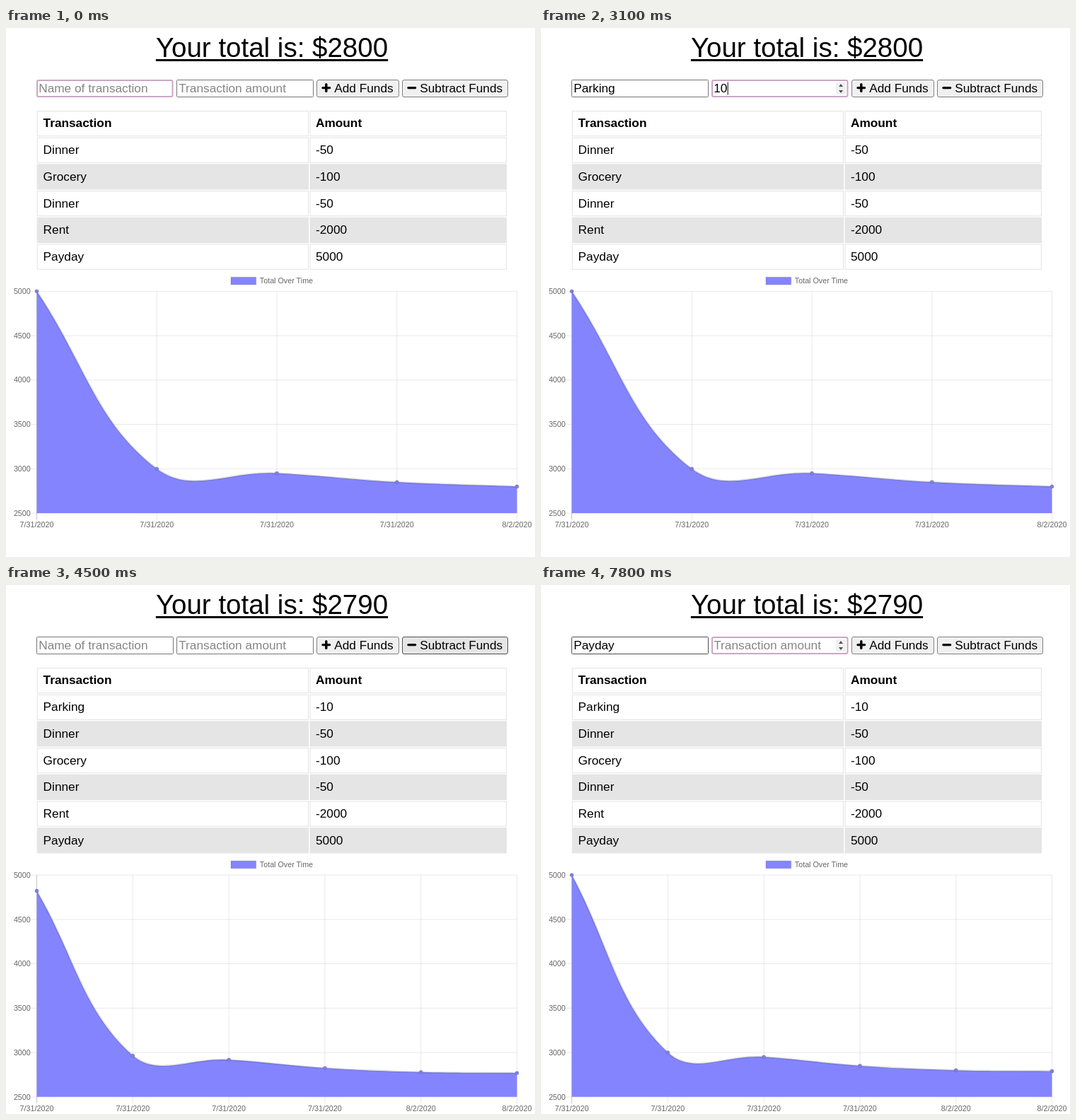
An HTML page for the animation above (8 s loop, 748 by 748 pixels).

```html
<!DOCTYPE html>
<html lang="en">
<head>
<meta charset="utf-8">
<title>Budget tracker</title>
<style>
html, body { margin: 0; width: 100%; height: 100%; overflow: hidden; background: #fff; }
body { position: relative; font-family: "Liberation Sans", Arial, sans-serif; }
h1 {
  position: absolute; left: 0; top: 6px; width: 752px; margin: 0;
  font-size: 38.5px; font-weight: 400; line-height: 44px; text-align: center; white-space: nowrap;
  text-decoration: underline; text-decoration-thickness: 3px; text-underline-offset: 3px;
}
svg { position: absolute; left: 0; top: 0; font-size: 17.25px; }
</style>
</head>
<body>
<h1 id="total"></h1>
<svg id="view" width="748" height="748" viewBox="0 0 748 748"></svg>
<script>
const LOOP = 8000, STEP = 100;
const FILL = '#8485fe', LINE = 'rgba(0,0,0,.1)';
const total = document.getElementById('total');
const view = document.getElementById('view');
const pen = document.createElement('canvas').getContext('2d');
pen.font = '17.25px "Liberation Sans", Arial, sans-serif';

const rows = [['Dinner', -50], ['Grocery', -100], ['Dinner', -50], ['Rent', -2000], ['Payday', 5000]];
const days = ['7/31/2020', '7/31/2020', '7/31/2020', '7/31/2020', '8/2/2020'];
const totals = [5000, 3000, 2950, 2850, 2800];

// Key press times of each typed word
const parking = [1000, 1200, 1300, 1500, 1600, 1700, 1800];
const ten = [2500, 2700];
const payday = [6000, 6200, 6300, 6500, 6600, 6800];
const caretEvents = [-900, ...parking, 2100, ...ten, 5700, ...payday, 7200];

const typed = (word, keys, t) => word.slice(0, keys.filter(k => k <= t).length);
const rect = (x, y, w, h, fill, stroke = 'none', r = 0, sw = 1) =>
  `<rect x="${x}" y="${y}" width="${w}" height="${h}" rx="${r}" fill="${fill}" stroke="${stroke}" stroke-width="${sw}"/>`;
const text = (x, y, s, attrs = '') => `<text x="${x}" y="${y}" ${attrs}>${s}</text>`;
const path = (d, attrs) => `<path d="${d}" ${attrs}/>`;

function field(x, hint, value, focused, hovered, caret, spinner) {
  let s = focused
    ? rect(x + 1, 74, 191.5, 23, '#fff', '#cba6c4', 2, 2)
    : rect(x + .5, 73.5, 193, 24, '#fff', hovered ? '#4f4f4f' : '#767676', 1);
  s += text(x + 3.2, 91, value || hint, `fill="${value ? '#000' : '#858585'}"`);
  if (focused && spinner) {
    s += rect(x + 176, 77, 14, 17, '#f0f0f0');
    s += path(`M${x + 180} 83l3-4 3 4zM${x + 180} 88l3 4 3-4z`, 'fill="#505050"');
  }
  if (focused && caret) s += rect(x + 3.5 + pen.measureText(value).width, 76.5, 1, 18, '#000');
  return s;
}

function button(x, w, label, icon, mode) {
  const [fill, edge] = { idle: ['#f0f0f0', '#808080'], hover: ['#e5e5e5', '#4f4f4f'], press: ['#f6f6f6', '#a6a6a6'] }[mode];
  return rect(x + .5, 73.5, w, 24, fill, edge, 2.5) +
    path(icon, 'stroke="#000" stroke-width="3.4" stroke-linecap="round"') +
    text(x + 25.2, 91, label);
}

function table(list) {
  return [['Transaction', 'Amount'], ...list].map((row, i) => {
    const y = 117.3 + 37.7 * i;
    const shade = i && i % 2 === 0 ? '#e5e5e5' : '#fff';
    const attrs = i ? '' : 'font-weight="700"';
    return rect(44.2, y + .2, 383.3, 35.2, shade, '#e3e3e3') + rect(430, y + .2, 277.4, 35.2, shade, '#e3e3e3') +
      text(52.6, y + 23.1, row[0], attrs) + text(438, y + 23.1, row[1], attrs);
  }).join('');
}

// Control points of a cardinal-like spline, tension 0.4, kept inside the plot
function controls(pts, top, bottom) {
  const clamp = y => Math.min(bottom, Math.max(top, y));
  return pts.map((p, i) => {
    const a = pts[i - 1] || p, b = pts[i + 1] || p;
    const da = Math.hypot(p[0] - a[0], p[1] - a[1]), db = Math.hypot(b[0] - p[0], b[1] - p[1]);
    const fa = .4 * da / (da + db), fb = .4 * db / (da + db);
    return [
      p[0] - fa * (b[0] - a[0]), clamp(p[1] - fa * (b[1] - a[1])),
      p[0] + fb * (b[0] - a[0]), clamp(p[1] + fb * (b[1] - a[1]))
    ];
  });
}

function chart(values, labels, dy, grow) {
  const left = 43.5, right = 722.5, top = 372.3 + dy, bottom = 686 + dy;
  const xAt = i => left + (right - left) * i / (values.length - 1);
  const small = 'font-size="10.75" fill="#666"';
  let s = rect(318, 352.3 + dy, 35.6, 10.6, FILL, LINE, 0, 1.5) + text(358.8, 361.4 + dy, 'Total Over Time', small);

  for (let i = 0; i < 6; i++) {
    const y = top + (bottom - top) * i / 5;
    s += path(`M35 ${y}H${right}`, `stroke="${LINE}" stroke-width=".9"`);
    s += text(34.8, y + 3.7, 5000 - 500 * i, small + ' text-anchor="end"');
  }
  labels.forEach((day, i) => {
    s += path(`M${xAt(i)} ${top}V${bottom + 9}`, `stroke="rgba(0,0,0,${i ? .1 : .25})" stroke-width=".9"`);
    s += text(xAt(i), bottom + 19.8, day, small + ' text-anchor="middle"');
  });

  const mix = (a, b) => a.map((v, i) => v + (b[i] - v) * grow);
  const flat = values.map((v, i) => [xAt(i), bottom]);
  const full = values.map((v, i) => [xAt(i), bottom - (v - 2500) / 2500 * (bottom - top)]);
  const flatCtl = controls(flat, top, bottom), fullCtl = controls(full, top, bottom);
  const pts = flat.map((p, i) => mix(p, full[i]));
  const ctl = flatCtl.map((c, i) => mix(c, fullCtl[i]));
  let curve = `M${pts[0]}`;
  for (let i = 1; i < pts.length; i++) curve += `C${ctl[i - 1].slice(2)} ${ctl[i].slice(0, 2)} ${pts[i]}`;

  s += path(`${curve}V${bottom}H${left}Z`, `fill="${FILL}"`);
  s += path(curve, 'fill="none" stroke="rgba(0,0,0,.12)" stroke-width="2.6"');
  for (const [x, y] of pts) s += `<circle cx="${x}" cy="${y}" r="2.6" fill="#7f7fe6" stroke="${LINE}"/>`;
  return s;
}

function draw(t) {
  const paid = t >= 4100;
  const focus = t < 2100 ? 'name' : t < 4000 ? 'amount' : t < 5700 ? '' : t < 7200 ? 'name' : 'amount';
  const hover = t < 3100 || t >= 5600 ? 'name' : t >= 3600 && t < 5400 ? 'sub' : '';
  const last = caretEvents.filter(e => e <= t).pop();
  const caret = (t - last) % 1000 < 500;
  const name = t < 4300 ? typed('Parking', parking, t) : typed('Payday', payday, t);
  const amount = t < 4300 ? typed('10', ten, t) : '';

  const p = paid ? Math.min(1, 4 / 60 + (t - 4100) / 960) : 1;
  const grow = 1 - (1 - p) ** 4;

  total.textContent = 'Your total is: $' + (paid ? 2790 : 2800);
  view.innerHTML =
    field(43, 'Name of transaction', name, focus === 'name', hover === 'name', caret) +
    field(241, 'Transaction amount', amount, focus === 'amount', false, caret, true) +
    button(439, 116, 'Add Funds', 'M448 84.6h9.6M452.8 79.8v9.6', 'idle') +
    button(560, 149, 'Subtract Funds', 'M569 84.6h9.6', t === 4000 ? 'press' : hover === 'sub' ? 'hover' : 'idle') +
    table(paid ? [['Parking', -10], ...rows] : rows) +
    (paid ? chart([...totals, 2790], [...days, '8/2/2020'], 37.8, grow) : chart(totals, days, 0, 1));
}

let shown = -1;
function tick(now) {
  const t = Math.floor(now % LOOP / STEP) * STEP;
  if (t !== shown) draw(shown = t);
  requestAnimationFrame(tick);
}
draw(0);
requestAnimationFrame(tick);
</script>
</body>
</html>
```
